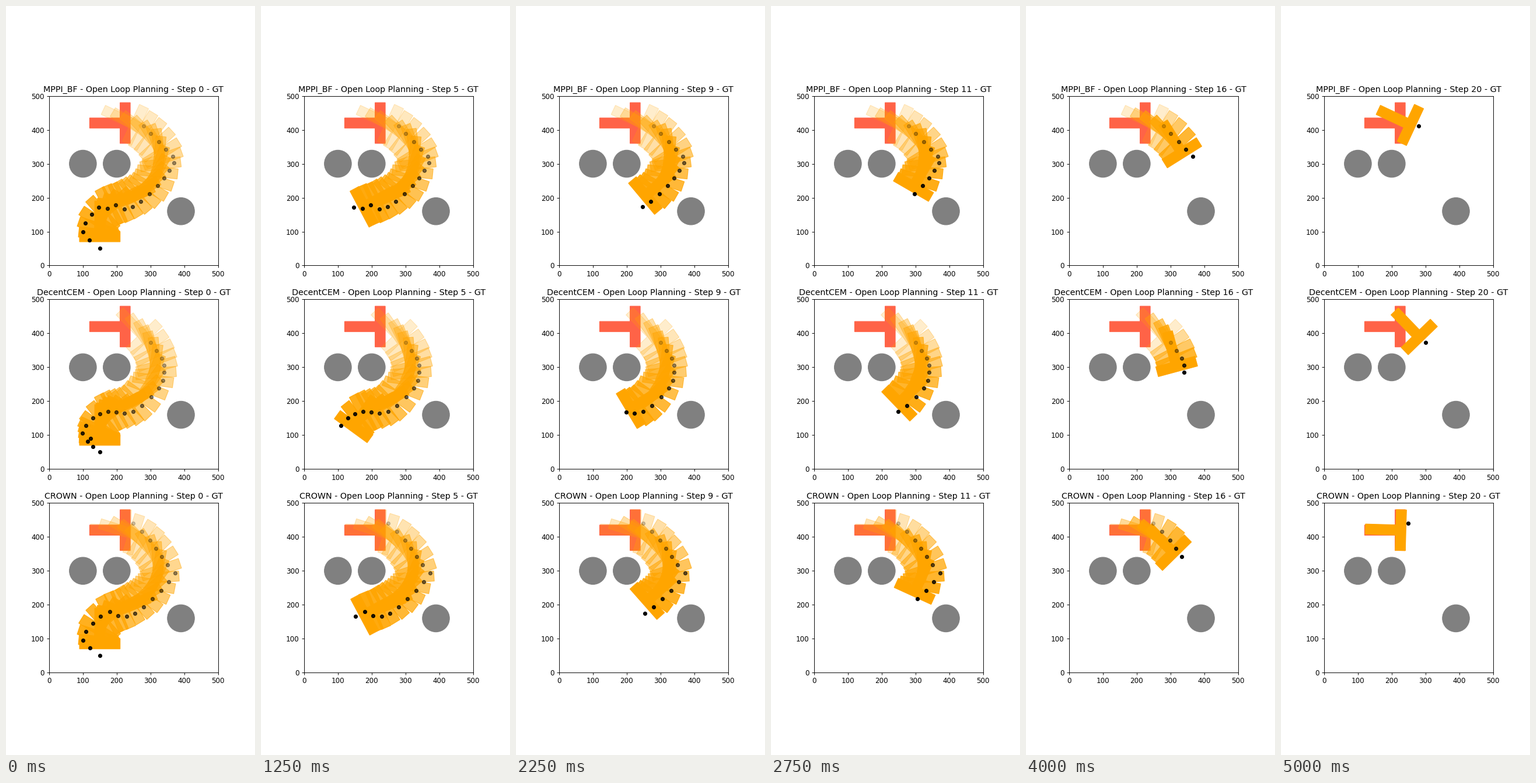
Write a matplotlib script that moves like this. It is 427x1280 px and loops after 5250 ms.

```python
import numpy as np
import matplotlib.pyplot as plt
from matplotlib.animation import FuncAnimation
from matplotlib.patches import Circle, Polygon

STEPS = 21
DPI = 256 / 3

# T block in its own frame: bar along x, stem along y.
T_SHAPE = np.array([(-60, 0), (60, 0), (60, 30), (15, 30),
                    (15, 120), (-15, 120), (-15, 30), (-60, 30)])
START = (150, 70, 0)
GOAL = (240, 420, 90)
OBSTACLES = [(100, 300), (200, 300), (390, 160)]

# Steps at which the block's key poses are given.
BLOCK_STEPS = (0, 3, 5, 7, 11, 14, 16, 18, 20)


def spline(steps, points, at_rest=False):
    """Cubic curve through the points, sampled at every step."""
    s, p = np.array(steps, float), np.array(points, float)
    slope = np.diff(p, axis=0) / np.diff(s)[:, None]
    inner = (p[2:] - p[:-2]) / (s[2:] - s[:-2])[:, None]
    first = slope[:1] * (0 if at_rest else 1)
    tangent = np.concatenate([first, inner, slope[-1:]])

    t = np.arange(STEPS)
    i = np.clip(np.searchsorted(s, t, side="right") - 1, 0, len(s) - 2)
    h = (s[i + 1] - s[i])[:, None]
    u = (t - s[i])[:, None] / h
    return (p[i] + u * h * slope[i]
            + h * u * (1 - u) ** 2 * (tangent[i] - slope[i])
            - h * u ** 2 * (1 - u) * (tangent[i + 1] - slope[i]))


def t_vertices(pose):
    x, y, deg = pose
    c, s = np.cos(np.radians(deg)), np.sin(np.radians(deg))
    return T_SHAPE @ np.array([(c, s), (-s, c)]) + (x, y)


class Panel:
    def __init__(self, ax, name, block_keys, push_keys):
        self.ax, self.name = ax, name
        ax.set_xlim(0, 500)
        ax.set_ylim(0, 500)
        ax.set_aspect("equal")
        for center in OBSTACLES:
            ax.add_patch(Circle(center, 40, color="gray"))
        self.add_block(GOAL, "tomato")

        poses = spline(BLOCK_STEPS, [START, *block_keys], at_rest=True)
        push_steps, *push_xy = zip(*push_keys)
        pushes = spline(push_steps, np.transpose(push_xy))
        self.blocks = [self.add_block(pose, "orange") for pose in poses]
        self.dots = [ax.plot(x, y, "ko", markersize=5)[0] for x, y in pushes]

    def add_block(self, pose, color):
        return self.ax.add_patch(
            Polygon(t_vertices(pose), color=color, snap=False))

    def show(self, step):
        """Show the rest of the plan, fading towards its end."""
        alphas = np.linspace(1, 0.2, STEPS - step)
        for i, pair in enumerate(zip(self.blocks, self.dots)):
            for artist in pair:
                artist.set_visible(i >= step)
                if i >= step:
                    artist.set_alpha(alphas[i - step])
        self.ax.set_title(f"{self.name} - Open Loop Planning - Step {step} - GT")


fig, axes = plt.subplots(3, 1, figsize=(427 / DPI, 1280 / DPI), dpi=DPI)

# Block keys are (x, y, degrees), pusher keys are (step, x, y).
panels = [
    Panel(axes[0], "MPPI_BF",
          [(138, 117, -33), (164, 166, -62), (199.5, 180, -65),
           (286.5, 219, -30), (331.5, 283.5, 7), (341.5, 319.5, 32),
           (311.5, 371, 52), (269, 408, 65)],
          [(0, 150, 50), (2, 100, 99), (5, 147, 172), (6, 172, 168),
           (7, 197, 178), (8, 222, 166), (10, 271, 189), (12, 321, 235),
           (15, 369, 303), (16, 365, 321), (20, 279, 411)]),
    Panel(axes[1], "DecentCEM",
          [(143, 94, -16), (138, 113, -36), (161.5, 158, -62.5),
           (241.5, 184.5, -46), (305.5, 248, -8), (322, 288, 15),
           (317.5, 330, 27), (292, 378.5, 44)],
          [(0, 150, 50), (2, 114, 82), (3, 123, 91), (4, 98, 105),
           (6, 129, 151), (8, 175, 169), (11, 248, 169), (14, 324, 238),
           (16, 340, 285), (18, 333, 326), (20, 300, 374)]),
    Panel(axes[2], "CROWN",
          [(138.5, 114, -32), (166, 163.5, -62), (205, 182, -66.5),
           (291.5, 226, -24.5), (335, 289, 18.5), (319, 343, 44.5),
           (286, 385.5, 58.5), (242, 419.5, 88.3)],
          [(0, 150, 50), (2, 100, 95), (4, 129, 145), (6, 179, 179),
           (7, 204, 168), (9, 254, 174), (14, 373, 293), (15, 350, 318),
           (18, 298, 391), (20, 249, 441)]),
]


def update(step):
    for panel in panels:
        panel.show(step)
    return []


anim = FuncAnimation(fig, update, frames=STEPS, interval=250,
                     init_func=lambda: update(0), repeat=True, repeat_delay=0)
plt.show()
```
